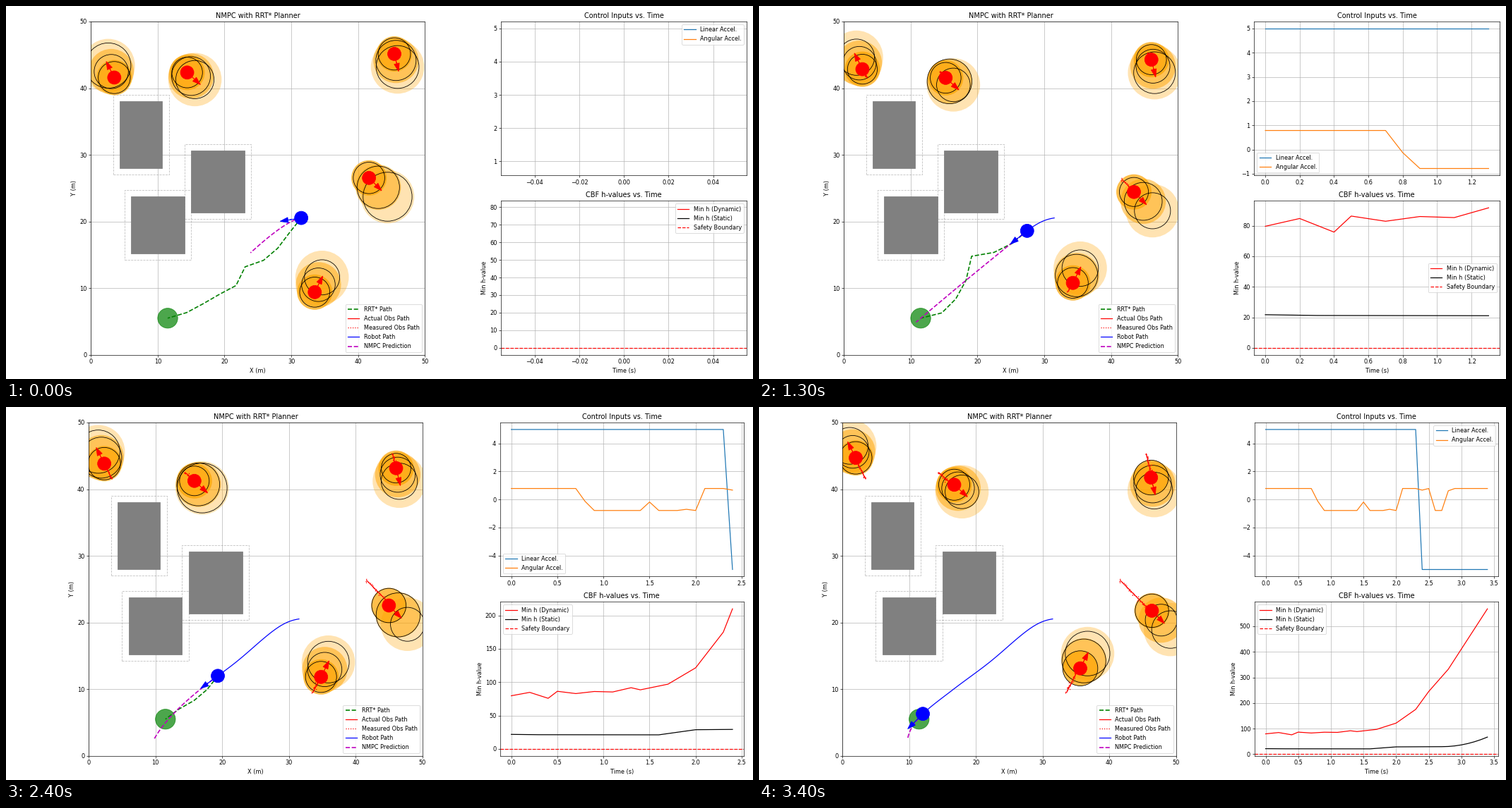
A matplotlib script for the animation above (3500 ms loop, 1058 px wide and 529 px high).

```python
import numpy as np
import matplotlib.pyplot as plt
from matplotlib.animation import FuncAnimation
from matplotlib.patches import Circle, Rectangle

STEPS, DT = 35, 0.1
DPI, LAYOUT_DPI = 529 / 9 + 1e-6, 100
GOAL = np.array([11.5, 5.5])
rng = np.random.default_rng(7)
steps = np.arange(STEPS)
time = steps * DT

# Control inputs: full throttle then braking, steering switching between limits
TURN = np.pi / 4
linear = np.where(steps < 24, 5.0, -5.0)
angular = np.full(STEPS, TURN)
angular[9:21] = angular[26:28] = -TURN
angular[[8, 15, 19, 24, 28]] = -0.13, -0.18, -0.70, 0.67, 0.62

# Barrier values
h_dynamic = np.interp(steps, [0, 2, 4, 5, 7, 9, 11, 13, 14, 17, 20, 23, 25, 28, 34],
                      [79.6, 84.7, 75.8, 86.3, 82.9, 86, 85.3, 91.7, 88.5, 97, 121.5,
                       175, 245, 332, 568])
h_static = (np.interp(steps, [0, 3, 16, 20, 27], [21.7, 21.2, 21, 28.7, 29.5])
            + 37.5 * np.clip((steps - 27) / 7, 0, 1) ** 2)

# Static obstacles: x, y, width, height
BLOCKS = [(4.35, 28, 6.35, 10), (15, 21.35, 8, 9.25), (6, 15.2, 8, 8.55)]

# Moving obstacles: steady motion seen through a noisy sensor
START = np.array([(3.54, 41.45), (14.4, 42.55), (45.5, 45.4), (41.5, 26.45), (33.55, 9.4)])
VELOCITY = np.array([(-.45, .9), (.58, -.53), (.24, -.98), (1.39, -1.41), (.55, 1.11)])
BOUND_RADII = np.sqrt([7, 11.5, 16])
actual = START + VELOCITY * (time + DT)[:, None, None]
measured = actual + rng.normal(0, 0.17, actual.shape)
radii = BOUND_RADII * rng.uniform([.82, .7, .62], [1, 1, .96], (STEPS, 5, 3))


def unit(angle):
    return np.array([np.cos(angle), np.sin(angle)])


def drive():
    """Integrate the robot's motion from its control inputs."""
    pos, angle, speed, spin = np.array([31.5, 20.53]), np.radians(188.9), 0.0, 0.0
    track, angles = [], []
    for accel, spin_accel in zip(linear, angular):
        pos = pos + DT * speed * unit(angle)
        angle += DT * spin
        speed += DT * accel
        spin += DT * spin_accel
        track.append(pos)
        angles.append(angle)
    return np.array(track), np.array(angles)


robot, heading = drive()


def planned_path(step):
    """Wandering waypoints between the robot and the goal."""
    noise = np.random.default_rng(100 + step)
    begin = robot[step]
    gap = GOAL - begin
    count = int(np.hypot(*gap) / 3)
    side = np.array([-gap[1], gap[0]]) / np.hypot(*gap)
    part = np.arange(1, count + 1) / (count + 1)
    sway = np.sin(np.pi * part) * noise.uniform(-1, 2) + noise.normal(0, 0.7, count)
    middle = begin + part[:, None] * gap + sway[:, None] * side
    return np.vstack([begin, middle, GOAL])


def prediction(step):
    """Curve that leaves along the heading and bends to the horizon point."""
    begin = robot[step]
    end = np.array([23.9 - 14.1 * min(step / 14, 1), 15.3 - 12.8 * min(step / 16, 1)])
    reach = np.interp(step, [9, 20], [0.25, 0.67]) * np.hypot(*(end - begin))
    bend = begin + reach * unit(heading[step])
    s = np.linspace(0, 1, 30)[:, None]
    return (1 - s) ** 2 * begin + 2 * s * (1 - s) * bend + s ** 2 * end


fig = plt.figure(figsize=(18, 9), dpi=DPI)
grid = fig.add_gridspec(2, 2, width_ratios=[2, 1])
ax_map = fig.add_subplot(grid[:, 0])
ax_ctrl = fig.add_subplot(grid[0, 1])
ax_cbf = fig.add_subplot(grid[1, 1])


def draw_agent(pos, angle, length, color):
    ax_map.add_patch(Circle(pos, 1.0, color=color, zorder=5))
    ax_map.arrow(*pos, *(length * unit(angle)), head_width=0.8, head_length=1.2,
                 fc=color, ec=color, zorder=6)


def draw_obstacle(k, step):
    centre, velocity = measured[step, k], VELOCITY[k]
    for ahead, alpha in ((2, 0.3), (1, 0.5), (0, 0.7)):
        ax_map.add_patch(Circle(centre + ahead * velocity, BOUND_RADII[ahead],
                                color="orange", alpha=alpha, lw=0))
    for ahead in range(3):
        ax_map.add_patch(Circle(centre + ahead * velocity, radii[step, k, ahead],
                                fill=False, ec="k", zorder=2))
    ax_map.plot(*actual[:step + 1, k].T, "r-", label=None if k else "Actual Obs Path")
    ax_map.plot(*measured[:step + 1, k].T, "r:", label=None if k else "Measured Obs Path")
    draw_agent(centre, np.arctan2(velocity[1], velocity[0]), 1.5, "r")


def draw_map(step):
    ax_map.set(xlim=(0, 50), ylim=(0, 50), aspect="equal", xlabel="X (m)", ylabel="Y (m)",
               title="NMPC with RRT* Planner")
    ax_map.set_axisbelow(True)
    ax_map.grid(True)
    for x, y, w, h in BLOCKS:
        ax_map.add_patch(Rectangle((x, y), w, h, color="gray"))
        ax_map.add_patch(Rectangle((x - 1, y - 1), w + 2, h + 2, fill=False,
                                   ec="gray", ls="--", alpha=0.5))
    ax_map.add_patch(Circle(GOAL, 1.5, color="green", alpha=0.7))
    ax_map.plot(*planned_path(step).T, "g--", lw=2, label="RRT* Path")
    for k in range(len(START)):
        draw_obstacle(k, step)
    ax_map.plot(*robot[:step + 1].T, "b-", label="Robot Path")
    ax_map.plot(*prediction(step).T, "m--", lw=2, label="NMPC Prediction")
    draw_agent(robot[step], heading[step], 2.0, "b")
    ax_map.legend(loc="lower right")


def draw_charts(step):
    seen = slice(step + 1)
    ax_ctrl.plot(time[seen], linear[seen], label="Linear Accel.")
    ax_ctrl.plot(time[seen], angular[seen], label="Angular Accel.")
    ax_ctrl.set_title("Control Inputs vs. Time")
    ax_cbf.plot(time[seen], h_dynamic[seen], "r-", label="Min h (Dynamic)")
    ax_cbf.plot(time[seen], h_static[seen], "k-", label="Min h (Static)")
    ax_cbf.axhline(0, color="r", ls="--", label="Safety Boundary")
    ax_cbf.set(title="CBF h-values vs. Time", xlabel="Time (s)", ylabel="Min h-value")
    for ax in (ax_ctrl, ax_cbf):
        ax.grid(True)
        ax.legend(loc="best")


def arrange():
    """Fit the margins from fixed defaults, at a finer dpi to avoid text rounding."""
    fig.subplots_adjust(left=0.125, right=0.9, bottom=0.11, top=0.88, wspace=0.2, hspace=0.2)
    fig.set_dpi(LAYOUT_DPI)
    fig.tight_layout()
    fig.set_dpi(DPI)


def update(step):
    for ax in (ax_map, ax_ctrl, ax_cbf):
        ax.cla()
    draw_map(step)
    draw_charts(step)
    arrange()
    return []


anim = FuncAnimation(fig, update, frames=STEPS, interval=100, repeat=True, repeat_delay=0)
plt.show()
```
